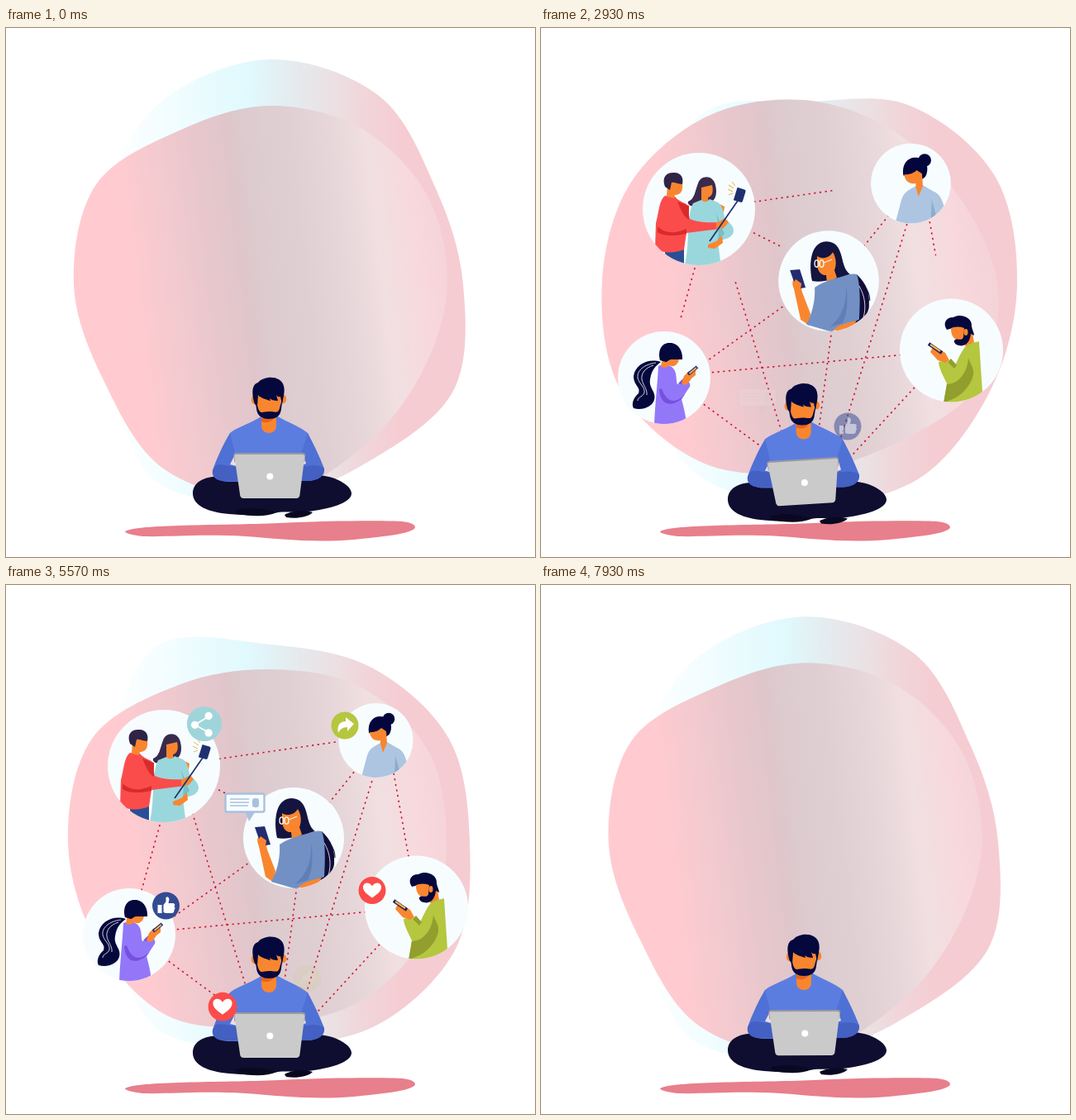
Animation, 640 px wide and 640 px high, one loop 8000 ms. Source, as an HTML page with a canvas:

```html
<!DOCTYPE html>
<html lang="en">
<head>
<meta charset="utf-8">
<title>Connected people</title>
<style>
html, body { margin: 0; width: 100%; height: 100%; overflow: hidden; background: #fff; }
canvas { display: block; width: 100vmin; height: 100vmin; }
</style>
</head>
<body>
<canvas id="stage" width="640" height="640"></canvas>
<script>
const ctx = document.getElementById('stage').getContext('2d');
const LOOP = 8000, TAU = Math.PI * 2;
const NAVY = '#05083d', SKIN = '#f9862f', PALE = '#f7fdff';
const clamp = v => Math.max(0, Math.min(1, v));

const paths = {};
const shape = d => paths[d] || (paths[d] = new Path2D(d));
function fill(color, d) { ctx.fillStyle = color; ctx.fill(shape(d)); }
function line(color, width, d) {
  ctx.strokeStyle = color; ctx.lineWidth = width; ctx.stroke(shape(d));
}
function oval(color, x, y, rx, ry = rx, rot = 0) {
  ctx.fillStyle = color;
  ctx.beginPath(); ctx.ellipse(x, y, rx, ry, rot, 0, TAU); ctx.fill();
}
function at(x, y, scale, rot, draw) {
  ctx.save(); ctx.translate(x, y); ctx.rotate(rot); ctx.scale(scale, scale);
  draw(); ctx.restore();
}

// Smooth periodic interpolation between poses
const POSES = [0, 1140, 2210, 3790, 5570, 6930];
function track(values, t) {
  const n = POSES.length;
  let i = n - 1;
  while (POSES[i] > t) i--;
  const time = k => POSES[(k + n) % n] + Math.floor(k / n) * LOOP;
  const val = k => values[(k + n) % n];
  const slope = k => (val(k + 1) - val(k - 1)) / (time(k + 1) - time(k - 1));
  const h = time(i + 1) - time(i), u = (t - time(i)) / h, u2 = u * u, u3 = u2 * u;
  return val(i) * (2 * u3 - 3 * u2 + 1) + slope(i) * h * (u3 - 2 * u2 + u) +
    val(i + 1) * (3 * u2 - 2 * u3) + slope(i + 1) * h * (u3 - u2);
}

// Radii every 30 degrees, one row per pose
const BACK = [
  [233, 256, 245, 260, 276, 225, 200, 230, 258, 272, 263, 231],
  [239, 243, 258, 258, 255, 220, 195, 222, 259, 256, 263, 246],
  [245, 247, 266, 262, 255, 220, 190, 215, 248, 238, 262, 266],
  [265, 269, 276, 268, 275, 232, 200, 210, 240, 207, 237, 257],
  [241, 259, 257, 247, 265, 225, 195, 225, 273, 238, 243, 249],
  [235, 257, 252, 250, 270, 225, 195, 225, 266, 255, 250, 236]];
const FRONT = [
  [214, 212, 226, 258, 258, 233, 238, 243, 216, 216, 218, 218],
  [226, 226, 220, 250, 262, 250, 233, 241, 229, 215, 207, 215],
  [231, 236, 220, 245, 260, 255, 233, 239, 240, 216, 209, 216],
  [230, 245, 222, 208, 238, 258, 260, 251, 227, 228, 219, 212],
  [213, 219, 222, 222, 245, 243, 245, 249, 219, 208, 216, 220],
  [212, 215, 222, 242, 256, 238, 241, 244, 215, 209, 213, 217]];

function gradient(x0, y0, x1, y1, from, to, stops) {
  const g = ctx.createLinearGradient(x0, y0, x1, y1);
  for (const [x, c] of stops) g.addColorStop((x - from) / (to - from), c);
  return g;
}
const backFill = gradient(120, 0, 480, 0, 120, 480, [
  [120, '#ffffff'], [200, '#f2fdff'], [250, '#e8fbfe'], [295, '#e0f9fd'], [316, '#e2f3f7'],
  [345, '#e4ecef'], [400, '#ecdfe2'], [430, '#f0d6da'], [480, '#f5ccd2']]);
const frontFill = gradient(80, 300, 533.5, 245.6, 80, 540, [
  [80, '#ffcbd0'], [150, '#ffcbd0'], [200, '#f3cacf'], [255, '#e6c7cc'], [290, '#dfc6cb'],
  [306, '#dccace'], [360, '#dfcfd3'], [410, '#e6d6d9'], [455, '#f1dfe1'], [480, '#f4dcdf'],
  [505, '#f8d8dd'], [540, '#f5d4d8']]);

function blob(rows, color, t) {
  const pts = rows[0].map((_, k) => {
    const r = track(rows.map(row => row[k]), t), a = k * TAU / 12;
    return [320 + r * Math.cos(a), 310 + r * Math.sin(a)];
  });
  const p = k => pts[(k + 12) % 12];
  ctx.beginPath();
  ctx.moveTo(...p(0));
  for (let k = 0; k < 12; k++) {
    const [a, b, c, d] = [p(k - 1), p(k), p(k + 1), p(k + 2)];
    ctx.bezierCurveTo(b[0] + (c[0] - a[0]) / 6, b[1] + (c[1] - a[1]) / 6,
      c[0] - (d[0] - b[0]) / 6, c[1] - (d[1] - b[1]) / 6, c[0], c[1]);
  }
  ctx.fillStyle = color;
  ctx.fill();
}

// Elastic entrance, quick exit
const OUT = 7150, OUT_LEN = 550;
const leave = t => clamp((t - OUT) / OUT_LEN);
function spring(age) {
  return age <= 0 ? 0 : 1 - Math.exp(-age * 1.71 / 260) * Math.cos(age * Math.PI / 260);
}
const pop = (t, start) => spring(t - start) * (1 - leave(t) ** 2);

// Start, end, then the points of the dotted line
const LINKS = [
  [520, 1680, [312, 540], [149, 420]],
  [520, 1550, [355, 540], [496, 387]],
  [300, 3880, [307, 540], [208, 219]],
  [390, 2390, [329, 540], [360, 302], [447, 194]],
  [520, 2580, [349, 540], [458, 188]],
  [1500, 2900, [496, 390], [149, 422]],
  [1500, 2800, [149, 440], [340, 303]],
  [2260, 3300, [191, 220], [447, 183]],
  [2260, 3300, [206, 219], [149, 423]],
  [2260, 3300, [191, 215], [348, 293]],
  [2500, 3500, [462, 188], [498, 390]]];

function links(t) {
  ctx.save();
  ctx.globalAlpha = 1 - leave(t);
  ctx.strokeStyle = '#d0142f';
  ctx.lineWidth = 1.6;
  ctx.setLineDash([2.3, 4.4]);
  for (const [start, end, ...pts] of LINKS) {
    const grown = clamp((t - start) / (end - start));
    if (!grown) continue;
    const len = pts.slice(1).map((p, i) => Math.hypot(p[0] - pts[i][0], p[1] - pts[i][1]));
    let left = grown * len.reduce((a, b) => a + b);
    ctx.beginPath();
    ctx.moveTo(...pts[0]);
    for (let i = 0; i < len.length && left > 0; i++) {
      const f = Math.min(1, left / len[i]), [a, b] = [pts[i], pts[i + 1]];
      ctx.lineTo(a[0] + (b[0] - a[0]) * f, a[1] + (b[1] - a[1]) * f);
      left -= len[i];
    }
    ctx.stroke();
  }
  ctx.restore();
}

function ponytailGirl() {
  fill(NAVY, 'M145 404C130 399 114 407 112 421C112 433 121 434 118 442C112 447 109 455 112 460C122 463 134 459 137 450C140 440 130 436 132 425C134 412 140 408 145 404Z');
  line('#fff', .8, 'M139 405C124 407 116 415 117 423C118 430 126 434 125 441C124 446 117 446 117 451M136 408C126 411 121 418 122 425C123 432 129 437 128 444');
  fill('#9377f9', 'M142 409C150 405 158 408 161 413C165 420 163 427 165 431L176 427C180 428 181 431 180 434L170 449C172 457 175 466 176 480H137C138 455 141 430 142 409Z');
  fill('#7650e0', 'M143 437C144 455 156 460 170 449L175 442C166 453 153 457 146 436ZM166 430L172 424 176 428 170 431Z');
  fill(SKIN, 'M170 430L173 421 179 415 187 414 187 420 182 424 178 430 174 432ZM147 400L155 397 167 399C167 405 163 410 158 409L154 408C154 411 147 412 145 409Z');
  fill(NAVY, 'M144 402C141 390 146 381 155 381C165 380 172 390 171 401H157C153 402 153 404 151 404Z');
  line('#1c2a78', 4, 'M178 419L189 410');
  line('#f5b04a', 2, 'M179.5 418L188 411');
}

function beardedMan() {
  fill(SKIN, 'M496 364C496 374 502 379 508 377L514 372 522 369 524 381 516 387 511 382 513 360C508 358 499 359 496 364Z');
  fill('#b5c63f', 'M513 386C521 379 526 381 530 379L534 440V460H486C489 445 490 436 491 430C486 420 481 410 481 404L490 402C495 405 497 409 500 411C504 401 509 391 513 386Z');
  fill('#929e2d', 'M491 431C505 431 516 417 517 399C520 409 528 414 519 430C511 443 501 449 487 453ZM492 404L496 400 503 408 500 412Z');
  fill(SKIN, 'M471 392L474 386 483 389 489 393 494 402 489 405 480 402Z');
  fill(NAVY, 'M491 365C486 358 489 350 499 350C508 345 522 350 521 361C522 366 524 369 524 372L520 370C519 380 513 386 506 384C502 384 499 380 500 378C504 374 508 380 511 374L512 363C506 361 500 361 495 364Z');
  oval(SKIN, 514, 368, 2.5, 4);
  line('#142063', 4, 'M469 382L485 393');
  line('#f5b04a', 2.2, 'M471 383L483 391');
}

function couple() {
  fill('#2a4e96', 'M150 265H173V290H150Z');
  fill('#3a2a4d', 'M190 188C193 178 208 177 211 190C214 202 210 209 205 211L189 214C181 218 177 213 178 210C186 207 186 198 190 188Z');
  fill(SKIN, 'M194 193L207 190C209 198 207 204 202 205L203 212H194ZM216 213L222 216 221 223 214 219Z');
  fill('#9ad7dc', 'M184 212L194 208C198 212 202 210 204 207L214 211C221 216 221 226 223 232C234 238 238 250 224 255L214 258 218 290H173C181 262 175 230 184 212Z');
  fill('#77bfc8', 'M212 224L215 242 214 257 222 249Z');
  fill('#fb4c4c', 'M150 203C143 208 143 221 139 236L138 268C150 273 163 272 173 268L176 248 216 243V235C200 236 190 235 180 231L176 213C170 210 165 208 162 204Z');
  fill('#d92b2b', 'M165 210L179 215V232C172 228 169 219 165 210ZM141 240C150 249 163 249 176 243V249C162 252 148 252 141 247Z');
  fill(SKIN, 'M153 190L160 185 171 188C172 197 169 202 162 202L161 206 152 204ZM212 236L223 230 227 235 221 242 212 243ZM202 262L212 258 219 251 220 260 210 267 202 266Z');
  fill('#2f2445', 'M150 192C146 181 151 175 160 175C169 174 173 181 171 189C165 189 161 186 158 187L156 196Z');
  line('#20306e', 1.7, 'M204 258L238 209');
  at(240, 202, 1, .3, () => fill('#20306e', 'M-5 -8H4Q6 -8 6 -6V6Q6 8 4 8H-5Z'));
  line('#e9b65c', 1, 'M235 191L231 186M233 194L227 190M232 198L226 195M232 200L227 202');
}

function readingWoman() {
  fill('#0f0d38', 'M382 298C395 310 398 322 397 334C398 345 390 354 370 362L363 360Z');
  line('#0f0d38', 1, 'M383 304C392 312 398 318 398 330');
  line('#fff', .8, 'M385 312C392 324 394 338 390 351');
  fill('#141440', 'M328 306C324 287 325 259 345 258C361 258 363 273 366 285C368 292 371 296 374 298C363 302 340 309 328 306Z');
  fill(SKIN, 'M334 276C340 280 349 278 353 271C357 277 358 286 355 293L358 302 346 308 345 299C338 300 334 292 334 286ZM305 312L304 307 309 302 313 307 316 320 326 346 324 360 314 353 309 330Z');
  fill('#7290c4', 'M331 314C338 309 346 306 356 303C368 300 376 296 382 298C387 310 386 335 385 353C374 357 362 360 352 368L321 359C328 346 332 330 331 314Z');
  fill('#5f7fb6', 'M369 312C370 332 365 350 349 362L365 357C371 345 372 326 369 312Z');
  fill(SKIN, 'M354 365C362 358 372 357 382 354L378 361 362 368Z');
  fill('#232c6e', 'M301 293L313 292 320 314 309 316Z');
  fill(SKIN, 'M304 310L308 304 315 309 314 316 306 316Z');
  ctx.strokeStyle = '#fff'; ctx.lineWidth = 1.3;
  for (const x of [333.5, 339.5]) {
    ctx.beginPath(); ctx.ellipse(x, 285, 2.5, 4.2, 0, 0, TAU); ctx.stroke();
  }
  line('#fff', 1, 'M342 284L352 280');
}

function bunWoman() {
  oval('#03063c', 463, 162, 7.3);
  fill('#03063c', 'M439 179C437 165 445 158 454 159C465 160 468 170 465 178C463 183 460 183 458 184Z');
  fill('#adc5e0', 'M453 191C446 195 440 197 437 206L428 240H490L484 211C481 202 478 199 473 197L461 190Z');
  fill('#8eabd0', 'M471 206L476 225 478 228 470 231Z');
  fill(SKIN, 'M440 178C447 178 451 176 454 173L460 177 461 191 456 203 453 192 453 188C446 189 441 186 440 178Z');
}

const FRIENDS = [
  [400, 149, 423, 56, ponytailGirl],
  [880, 496.5, 390, 62.5, beardedMan],
  [1690, 191, 219, 68, couple],
  [2300, 348, 306, 61, readingWoman],
  [2600, 447.5, 188, 45, bunWoman]];

function friend(t, [start, x, y, r, draw]) {
  const s = pop(t, start);
  if (s <= 0) return;
  at(x, y, s, 0, () => {
    oval(PALE, 0, 0, r);
    ctx.clip();
    ctx.translate(-x, -y);
    draw();
  });
}

// Icons are drawn around 0,0 with a radius of 16.5
const ICONS = {
  bubble() {
    fill('#a9c0de', 'M1 11L5 22 12 11Z');
    ctx.fillStyle = PALE; ctx.strokeStyle = '#a9c0de'; ctx.lineWidth = 2.4;
    ctx.beginPath(); ctx.roundRect(-23.5, -11.5, 47, 22, 2); ctx.fill(); ctx.stroke();
    line('#a9c0de', 1.6, 'M-18 -5H5M-18 -1H5M-18 3H4');
    ctx.fillStyle = '#a9c0de';
    ctx.beginPath(); ctx.roundRect(9, -6, 8, 11, 3); ctx.fill();
  },
  heart() {
    oval('#fb4b4b', 0, 0, 16.5);
    fill('#fff', 'M0 9C-7 4 -11 1 -11 -4C-11 -10 -3 -11 0 -5C3 -11 11 -10 11 -4C11 1 7 4 0 9Z');
  },
  thumb() {
    oval('#334b93', 0, 0, 16.5);
    fill('#fff', 'M-10 -1H-5V9H-10ZM-3 -1L0 -5V-10Q3 -12 4 -8L3 -3H9Q12 -2 10 1Q12 3 10 5Q10 9 7 9H0L-3 8Z');
  },
  share() {
    oval('#9fd5da', 0, 0, 16.5);
    line('#fff', 1.4, 'M4 -7L-9 1 4 8');
    oval('#fff', 4, -7.5, 3.6); oval('#fff', -9, 1, 3.6); oval('#fff', 4, 8.5, 3.6);
  },
  arrow() {
    oval('#b5c63f', 0, 0, 16.5);
    fill('#fff', 'M1 -10L11 -2 3 7V2C-3 2 -6 5 -8 9C-10 0 -6 -5 1 -5Z');
  }
};

const BADGES = [
  ['bubble', 3200, 289, 264, 1], ['heart', 3530, 443, 369.5, 1], ['thumb', 3900, 193.5, 388, 1],
  ['share', 4300, 240, 168, 1.28], ['arrow', 4600, 410, 170, 1]];
const RISING = [
  ['bubble', 880, 262, 495.5, .96], ['thumb', 1400, 371, 518, 1], ['share', 3040, 277, 512, .88],
  ['arrow', 3530, 364.5, 524, 1], ['heart', 5430, 262, 513.5, 1]];

function badges(t) {
  for (const [name, start, x, y, size] of BADGES) {
    const s = pop(t, start) * size;
    if (s > 0) at(x, y, s, 0, ICONS[name]);
  }
}
function rising(t) {
  for (const [name, start, x, y, size] of RISING) {
    const age = t - start, alpha = clamp((2150 - age) / 1200);
    if (age <= 0 || !alpha) continue;
    ctx.globalAlpha = alpha;
    at(x, y - age * .0235, spring(age) * size, 0, ICONS[name]);
    ctx.globalAlpha = 1;
  }
}

function head() {
  oval(SKIN, 300, 450, 3.2, 5); oval(SKIN, 336, 449, 3.2, 5);
  fill(SKIN, 'M304 444H333L332 464C328 472 308 472 304 462Z');
  fill(NAVY, 'M301 455C297 443 297 431 305 429C312 420 333 420 336 433C338 440 335 448 334 456L332 446C329 447 328 445 327 444L329 451C324 451 321 450 319 448L320 451C312 449 306 446 305 444L304 458Z');
  fill(NAVY, 'M301 445L303 461C304 470 311 473 318 473C326 473 332 470 333 461L335 445 331 460C329 467 326 464 318 464C310 464 308 468 305 460Z');
}

function laptop() {
  fill('#9b999f', 'M-44 -26Q-44 -29 -41 -29H40Q43 -29 43 -26L42 -18H-43Z');
  fill('#cacaca', 'M-43 -25Q-43 -27 -41 -27H39Q42 -27 42 -24L36 23Q35 26 32 26H-32Q-35 26 -36 23Z');
  oval('#fff', 0, -.5, 4);
}

function worker(t) {
  const bob = 7.5 * (1 - Math.cos(t * TAU / 2000)) / 2;
  const sway = track([0, 3, -3, 0, 0, 3.5], t);
  const tilt = track([0, 1.3, -3.2, -2.9, 0, -2.8], t) * Math.PI / 180;
  ctx.save();
  ctx.translate(0, bob);
  fill('#0f0d30', 'M226 563C226 548 243 541 262 543C300 549 340 548 375 541C397 541 418 553 418 563C418 575 390 582 365 585C345 587 335 584 325 587C310 590 290 590 270 588C245 586 226 578 226 563Z');
  fill('#0a0820', 'M278 583C295 579 315 582 327 586C315 592 295 591 278 587ZM337 589C345 584 362 583 371 586C366 592 350 594 339 592Z');
  fill('#5c7de0', 'M309 470L300 475C288 481 275 486 271 490L264 520 276 546H362L372 515 365 490C356 482 340 477 327 469Z');
  fill('#4f70d5', 'M271 490C263 503 254 523 250 535C248 544 258 549 270 549H300V530H275L277 514ZM365 490C373 505 380 520 385 533C386 542 378 547 366 548H335V530H360L357 515Z');
  fill('#4360c2', 'M250 536C254 523 262 530 282 531V548H270C255 549 249 544 250 536ZM385 533C378 527 370 530 355 530V548H366C378 547 386 542 385 533Z');
  fill('#efdce4', 'M277 516L271 528 279 530ZM360 517L363 527 358 529Z');
  ctx.save();
  ctx.translate(sway * .15, 0);
  fill(SKIN, 'M309 466H327V481C327 493 309 493 309 481Z');
  fill('#e8631b', 'M309 472H324C320 478 313 478 309 476Z');
  ctx.restore();
  at(sway, 0, 1, 0, head);
  at(319.3 + sway * .2, 543, 1, tilt, laptop);
  ctx.restore();
}

function draw(t) {
  ctx.fillStyle = '#fff';
  ctx.fillRect(0, 0, 640, 640);
  blob(BACK, backFill, t);
  blob(FRONT, frontFill, t);
  links(t);
  for (const f of FRIENDS) friend(t, f);
  badges(t);
  fill('#e87f8c', 'M144 609C160 600 260 602 330 599C390 596 440 596 470 596.5C490 597 495 601 495 604C494 612 450 616 420 619C370 623 330 618 290 615C230 612 200 616 165 615C150 613 144 611 144 609Z');
  worker(t);
  rising(t);
}

const begin = performance.now();
function tick() {
  draw((performance.now() - begin) % LOOP);
  requestAnimationFrame(tick);
}
tick();
</script>
</body>
</html>
```
